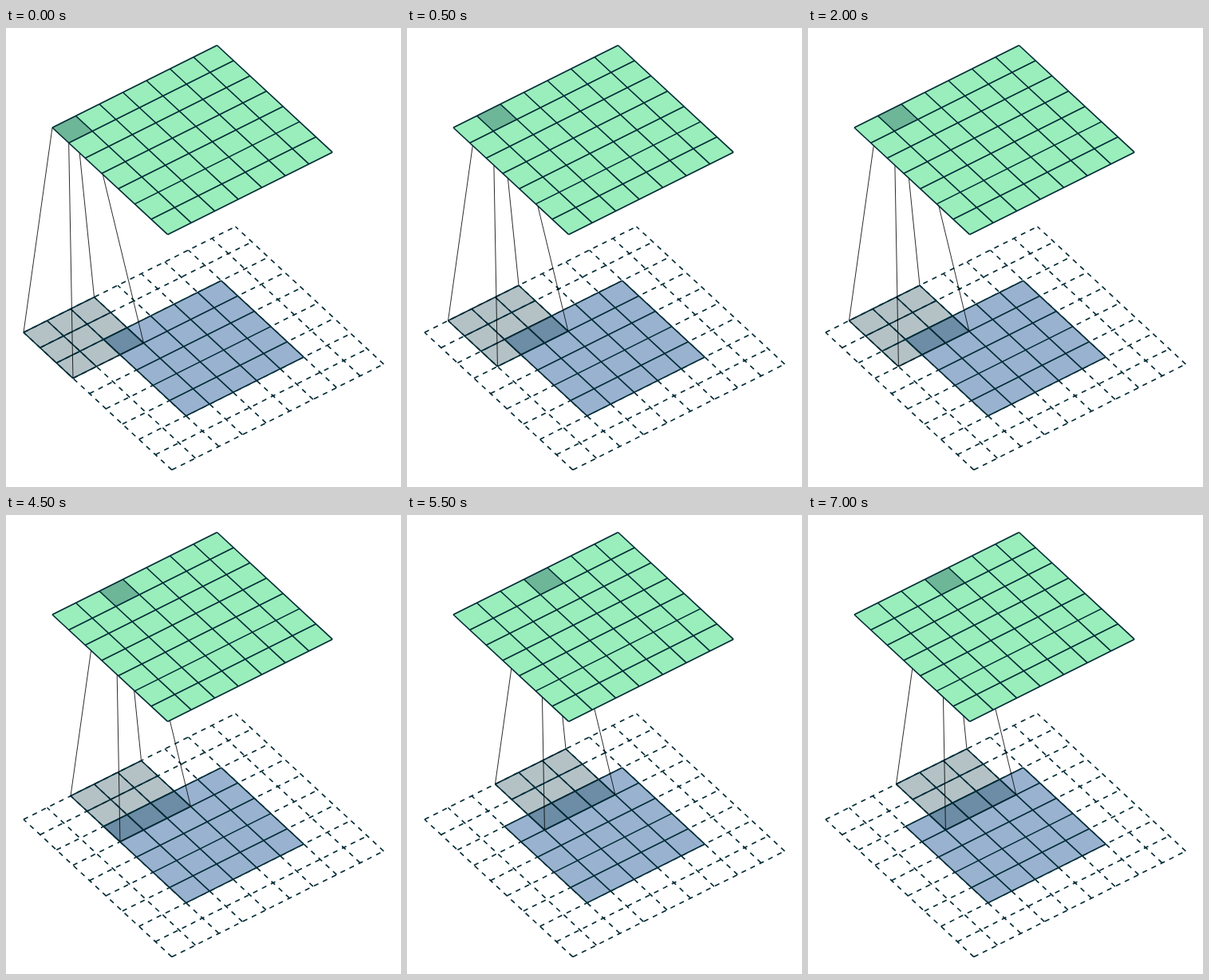
These frames come from a looping animation (495x576 px, 8 s). An HTML page with a canvas:

```html
<!DOCTYPE html>
<html lang="en">
<head>
<meta charset="utf-8">
<title>Padded convolution</title>
<style>
  html, body { margin: 0; width: 100%; height: 100%; overflow: hidden; background: #fff; }
  canvas { display: block; }
</style>
</head>
<body>
<canvas id="stage" width="495" height="576"></canvas>
<script>
const ctx = document.getElementById('stage').getContext('2d');
const LOOP = 8000, STEP = 2500, FIRST_STEP = 500;
const UNIT = 29.5;
const PT = UNIT / 14.226;
const LINE = '#002b36', SHADE = 'rgba(7, 54, 66, 0.3)';
const GREEN = '#99eebb', BLUE = '#99b2d0';

// Maps cell coordinates on a slanted plane to the stage.
const plane = (x, y) => (u, v) => [
  x + UNIT * (u + 0.7 * v),
  y + UNIT * (-0.5 * u + 0.65 * v)
];
const output = plane(58, 125);
const input = plane(22, 382);

function fillSquare(at, u, v, size, color) {
  ctx.beginPath();
  ctx.moveTo(...at(u, v));
  ctx.lineTo(...at(u + size, v));
  ctx.lineTo(...at(u + size, v + size));
  ctx.lineTo(...at(u, v + size));
  ctx.closePath();
  ctx.fillStyle = color;
  ctx.fill();
}

function line(from, to) {
  ctx.beginPath();
  ctx.moveTo(...from);
  ctx.lineTo(...to);
  ctx.stroke();
}

function grid(at, u, v, size, dash = []) {
  ctx.strokeStyle = LINE;
  ctx.lineWidth = 0.8 * PT;
  ctx.setLineDash(dash);
  for (let i = 0; i <= size; i++) {
    line(at(u, v + i), at(u + size, v + i));
    line(at(u + i, v + size), at(u + i, v));
  }
  ctx.setLineDash([]);
}

function projection(col) {
  ctx.strokeStyle = '#000';
  ctx.lineWidth = 0.4 * PT;
  for (const du of [0, 1]) {
    for (const dv of [0, 1]) {
      line(output(col + du, dv), input(col + 3 * du, 3 * dv));
    }
  }
}

function draw(col) {
  ctx.fillStyle = '#fff';
  ctx.fillRect(0, 0, 495, 576);

  grid(input, 0, 0, 9, [3 * PT, 3 * PT]);
  fillSquare(input, 2, 2, 5, BLUE);
  grid(input, 2, 2, 5);
  fillSquare(input, col, 0, 3, SHADE);
  grid(input, col, 0, 3);

  projection(col);

  fillSquare(output, 0, 0, 7, GREEN);
  fillSquare(output, col, 0, 1, SHADE);
  grid(output, 0, 0, 7);
}

function frame() {
  const t = performance.now() % LOOP;
  draw(Math.floor((t + STEP - FIRST_STEP) / STEP));
  requestAnimationFrame(frame);
}
frame();
</script>
</body>
</html>
```
